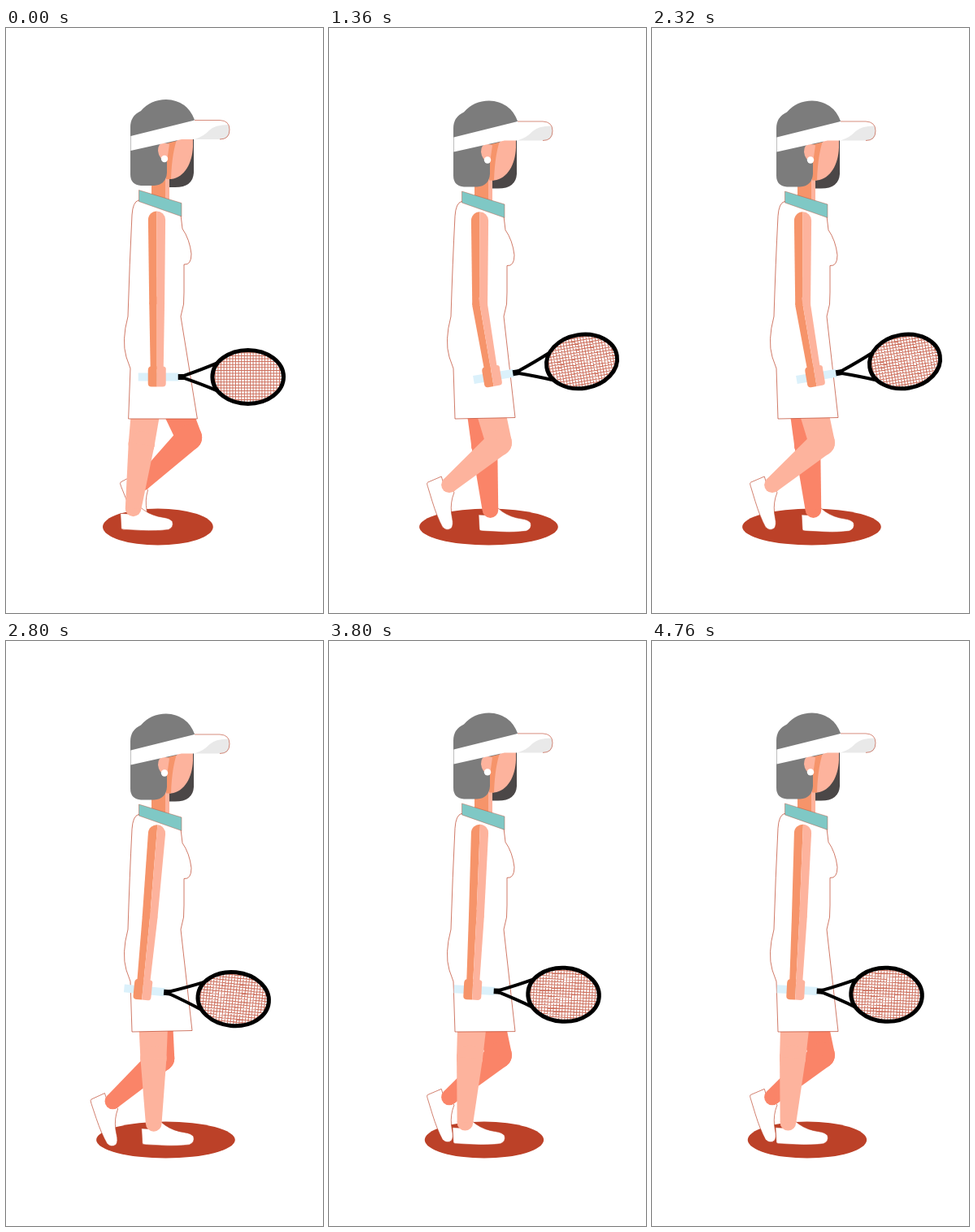
Write an HTML page with a canvas that moves like this. It is 390 by 720 pixels and loops after 4800 ms.

```html
<!DOCTYPE html>
<html lang="en">
<head>
<meta charset="utf-8">
<title>Walking tennis player</title>
<style>
html, body { margin: 0; width: 100%; height: 100%; overflow: hidden; background: #fff; }
canvas { display: block; }
</style>
</head>
<body>
<canvas id="stage" width="390" height="720"></canvas>
<script>
const ctx = document.getElementById('stage').getContext('2d');
const STRIDE = 960, STEP = 40, RAD = Math.PI / 180;
const CLAY = '#bc4128', SKIN = '#fdb39d', TAN = '#f6946a', FAR_SKIN = '#fa8468';
const HAIR = '#7c7c7c', DARK_HAIR = '#4b4747', TEAL = '#7fc8c5', GRIP = '#dbf1fb';

const wave = (t, peak, period) => Math.cos((t - peak) / period * 2 * Math.PI);
const wrap = t => ((t % STRIDE) + STRIDE) % STRIDE;
const ease = (t, from, to) => {
  const u = Math.min(1, Math.max(0, (t - from) / (to - from)));
  return (1 - Math.cos(u * Math.PI)) / 2;
};

// Joint angles in degrees, positive is forward.
const upperArm = t => -2.3 + 9.2 * wave(t, 200, STRIDE);
const foreArm = t => 2 + 12 * wave(t, 265, STRIDE);
const thighAngle = t => {
  const p = wrap(t - 80);
  return -10 + 44 * (ease(p, 160, 460) - ease(p, 460, STRIDE));
};
const kneeBend = t => 69 * Math.max(0, wave(wrap(t), 450, 1400)) ** 3;
// The foot lies flat on a straight leg and follows the shin on a bent one.
const footTilt = (shin, bend) => (8 - 1.25 * shin) * Math.min(1, bend / 15);

function shape(path, fill, line) {
  const p = new Path2D(path);
  if (fill) { ctx.fillStyle = fill; ctx.fill(p); }
  if (line) { ctx.strokeStyle = CLAY; ctx.lineWidth = line; ctx.stroke(p); }
}

function ellipse(x, y, rx, ry, fill) {
  ctx.beginPath();
  ctx.ellipse(x, y, rx, ry, 0, 0, 7);
  if (fill) { ctx.fillStyle = fill; ctx.fill(); }
}

function placed(p, degrees, draw) {
  ctx.save();
  ctx.translate(p.x, p.y);
  ctx.rotate(degrees * RAD);
  draw();
  ctx.restore();
}

const swing = (p, length, degrees) => ({
  x: p.x + length * Math.sin(degrees * RAD),
  y: p.y + length * Math.cos(degrees * RAD)
});

function taper(a, ra, b, rb, fill) {
  const d = Math.hypot(b.x - a.x, b.y - a.y), nx = (a.y - b.y) / d, ny = (b.x - a.x) / d;
  ellipse(a.x, a.y, ra, ra, fill);
  ellipse(b.x, b.y, rb, rb, fill);
  ctx.beginPath();
  ctx.moveTo(a.x + nx * ra, a.y + ny * ra);
  ctx.lineTo(b.x + nx * rb, b.y + ny * rb);
  ctx.lineTo(b.x - nx * rb, b.y - ny * rb);
  ctx.lineTo(a.x - nx * ra, a.y - ny * ra);
  ctx.fill();
}

function shoe() {
  shape('M-15 0L-14 18Q-14 20-9 20L10 21Q30 22 44 20Q51 17 49 10Q46 6 38 5Q24 3 14-4L9-8L5-7L4 1Z',
    '#fff', 0.6);
}

function leg(hip, phase, fill) {
  const thigh = thighAngle(phase), bend = kneeBend(phase), shin = thigh - bend;
  const knee = swing(hip, 113, thigh);
  placed(swing(knee, 86, shin), footTilt(shin, bend), shoe);
  taper(hip, 21, knee, 16, fill);
  taper(knee, 16, swing(knee, 80, shin), 9.8, fill);
}

function armPart(length, top, end) {
  for (const [side, fill] of [[-1, TAN], [1, SKIN]]) {
    shape(`M0 ${-top}A${top} ${top} 0 0 ${side > 0 ? 1 : 0} ${side * top} 0` +
      `L${side * end} ${length}L0 ${length}Z`, fill);
  }
}

function strings() {
  ctx.save();
  ellipse(112, 0, 43, 33);
  ctx.clip();
  let grid = '';
  for (let d = -44; d < 45; d += 3.6) grid += `M${112 + d}-34V34M68 ${d}H156`;
  ctx.globalAlpha = 0.75;
  shape(grid, null, 1);
  ctx.restore();
}

function racket() {
  ctx.fillStyle = GRIP;
  ctx.fillRect(-23, -5, 50, 10);
  ctx.fillStyle = '#000';
  ctx.fillRect(26, -3.5, 8, 7);
  ctx.strokeStyle = '#000';
  ctx.lineWidth = 4;
  ctx.stroke(new Path2D('M74-17Q55-9 32-1M74 17Q55 9 32 1'));
  ctx.lineWidth = 5;
  ellipse(112, 0, 43.8, 33);
  ctx.stroke();
}

function hand() {
  shape('M0-13H-7Q-11-13-11-8V8Q-11 12-7 12H0Z', TAN);
  shape('M0-13H7Q12-13 11-8V8Q11 12 7 12H0Z', SKIN);
}

function head() {
  shape('M200 130H231V178Q230 196 208 196H198Z', DARK_HAIR);
  shape('M179 180H201V213L179 206Z', TAN);
  shape('M196 180H201V213L196 209Z', SKIN);
  shape('M197 132H230V146C229 166 220 184 203 186H197Z', SKIN);
  shape('M197 132H212Q204 152 203 186H197Z', TAN);
  shape('M153 122Q153 108 166 102Q178 88 197 88Q223 89 232 113L210 139L198 142' +
    'V178Q197 193 182 194H166Q153 193 153 180Z', HAIR);
  shape('M201 143Q187 138 187 151Q188 162 198 164Z', SKIN);
  ellipse(195, 161, 4.2, 4.2, '#fff');
  shape('M153.5 133L232 113.5H263Q275 114 275 125Q275 137 263 137H216L153.5 151Z', '#fff');
  shape('M232 137Q244 133 250 126Q257 119 274 119Q279 137 263 137Z', '#e9e9e9');
  shape('M232 113.5H263Q275 114 275 125Q275 137 263 137', null, 0.6);
}

function shadow(t) {
  const spread = shift => (1 - wave(t, shift, STRIDE / 2)) / 2;
  const left = 119 - 55 * spread(0) ** 1.4, right = 254 + 82 * spread(15);
  ellipse((left + right) / 2, 614, (right - left) / 2, 22.5, CLAY);
}

// The hem widens with whichever thigh pushes it out.
function dress(hip, phases, bob) {
  const reach = phases.map(p => hip.x + 81 * Math.tan(thighAngle(p) * RAD));
  const hemLeft = Math.min(155, Math.min(...reach) - 20);
  const hemRight = Math.max(229, Math.max(...reach) + 20);
  const y = v => v + bob;
  shape(`M163 ${y(212)}Q156 ${y(214)} 155 ${y(230)}Q152 290 150 355Q142 385 148 405L153 419` +
    `L${hemLeft} 481L${hemRight} ${481 - bob}L215 355Q220 340 219 325V${y(291)}` +
    `Q228 ${y(292)} 228 ${y(278)}Q226 ${y(260)} 217 ${y(247)}L215 ${y(230)}Z`, '#fff', 0.7);
}

function draw(t) {
  const bob = 3 * (1 - wave(t, 0, STRIDE / 2));
  const hip = { x: 181, y: 400 + bob * 0.6 };
  const shoulder = { x: 185.5, y: 236 + bob * 0.6 };
  const upper = upperArm(t), fore = foreArm(t);
  const elbow = swing(shoulder, 104, upper), wrist = swing(elbow, 89.5, fore);
  const farPhase = t - 520;

  ctx.clearRect(0, 0, 390, 720);
  shadow(t);
  placed(wrist, -fore, strings);
  leg(hip, farPhase, FAR_SKIN);
  leg(hip, t, SKIN);
  dress(hip, [t, farPhase], bob);

  placed({ x: 0, y: bob }, 0, () => {
    head();
    shape('M163.5 199.5L216 215.5V232L163.5 213.5Z', TEAL, 0.4);
  });

  placed(wrist, -fore, racket);
  placed(shoulder, -upper, () => armPart(104, 10.6, 9.4));
  placed(elbow, -fore, () => armPart(80, 9.4, 8));
  placed(wrist, -fore, hand);
}

const start = performance.now();
function tick() {
  const elapsed = performance.now() - start;
  draw(Math.floor(elapsed / STEP) * STEP % STRIDE);
  requestAnimationFrame(tick);
}
tick();
</script>
</body>
</html>
```
